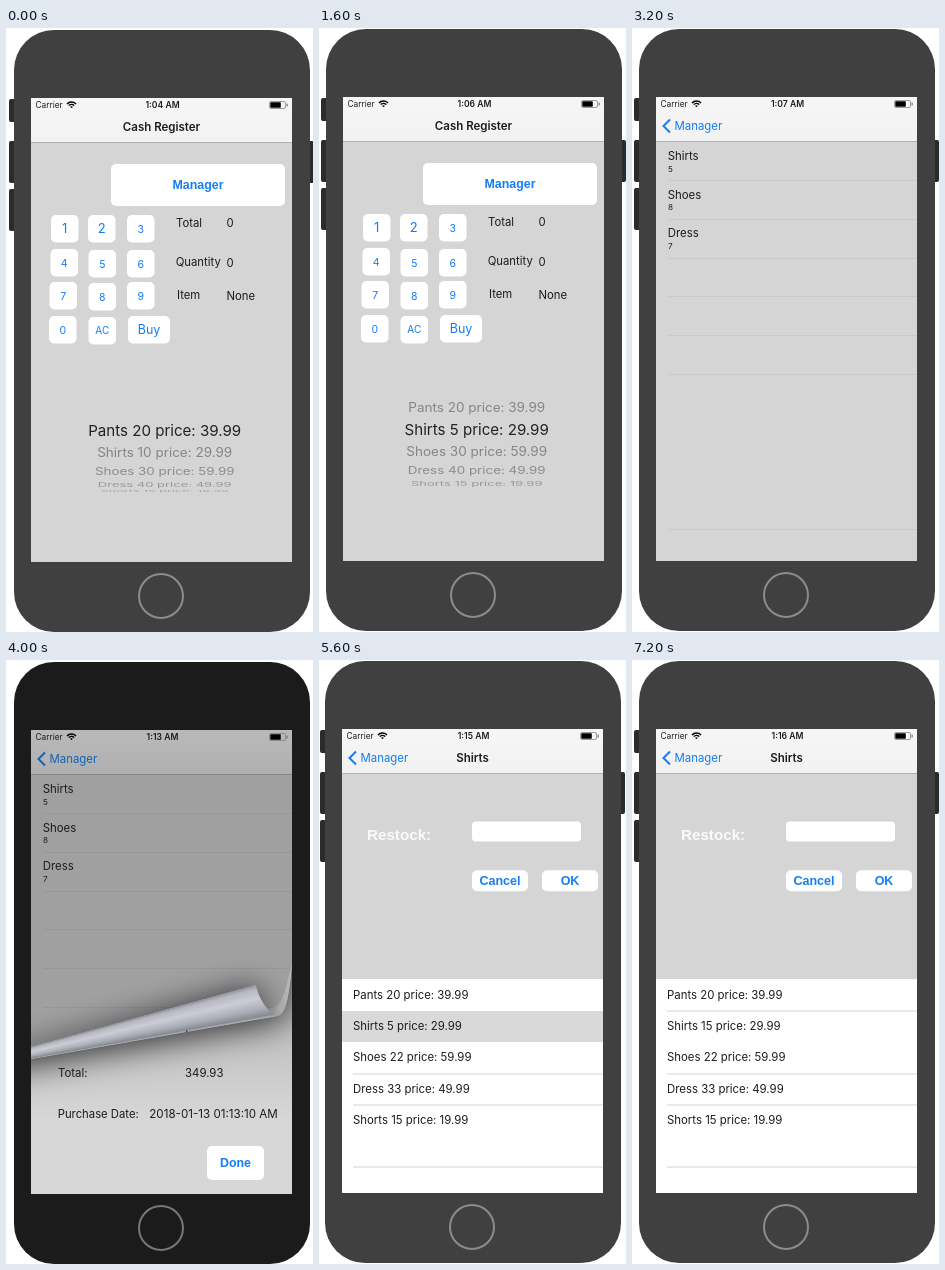
Write an HTML page with a canvas that moves like this. It is 307 by 604 pixels and loops after 8 s.

```html
<!DOCTYPE html>
<html lang="en">
<head>
<meta charset="utf-8">
<title>Cash register demo</title>
<style>
html, body { margin: 0; width: 100%; height: 100%; overflow: hidden; background: #fff; }
canvas { display: block; }
</style>
</head>
<body>
<canvas id="stage" width="307" height="604"></canvas>
<script>
const ctx = document.getElementById('stage').getContext('2d');
const BLUE = '#147df5', INK = '#1c1c1c', GREY = '#d5d5d5';
const SANS = 'Inter, sans-serif', HELV = '"Liberation Sans", Arial, sans-serif';
const STEP = 800;
const LEFT = 25, TOP = 70, RIGHT = 286, BOTTOM = 534;

function box(x, y, w, h, r, fill) {
  ctx.fillStyle = fill;
  ctx.beginPath();
  ctx.roundRect(x, y, w, h, r);
  ctx.fill();
}

function line(x1, y1, x2, y2, color) {
  ctx.strokeStyle = color;
  ctx.lineWidth = 1;
  ctx.beginPath();
  ctx.moveTo(x1, y1);
  ctx.lineTo(x2, y2);
  ctx.stroke();
}

function text(str, x, y, size, { color = INK, weight = 400, align = 'left', font = SANS } = {}) {
  ctx.font = `${weight} ${size}px ${font}`;
  ctx.fillStyle = color;
  ctx.textAlign = align;
  ctx.fillText(str, x, y);
}

function addStops(gradient, stops, span = 1) {
  for (const [at, color] of stops) gradient.addColorStop(at * span, color);
  return gradient;
}

function button(label, x, y, w, h, size, bold = true) {
  box(x, y, w, h, 5, '#fff');
  text(label, x + w / 2, y + h / 2 + size * 0.36, size, {
    color: BLUE, align: 'center', weight: bold ? 700 : 400, font: bold ? HELV : SANS
  });
}

function phone(dark) {
  if (!dark) {
    for (const [y, h] of [[71, 23], [113, 42], [161, 42]]) box(3, y, 7, h, 2, '#2b2b2b');
    box(301, 113, 7, 42, 2, '#2b2b2b');
  }
  box(8, 2, 296, 602, 40, dark ? '#1b1b1b' : '#404040');
  ctx.strokeStyle = dark ? '#777' : '#8c8c8c';
  ctx.lineWidth = 2;
  ctx.beginPath();
  ctx.arc(155, 568, 22, 0, Math.PI * 2);
  ctx.stroke();
}

function wifi(x, y) {
  ctx.strokeStyle = '#000';
  ctx.lineWidth = 1.5;
  for (const r of [6.2, 3.8, 1.2]) {
    ctx.beginPath();
    ctx.arc(x, y, r, -Math.PI * 0.76, -Math.PI * 0.24);
    ctx.stroke();
  }
}

function navBar(time, title, back, dark) {
  ctx.fillStyle = addStops(ctx.createLinearGradient(0, TOP, 0, 114),
    dark ? [[0, '#b9b9b9'], [1, '#b0b0b0']] : [[0, '#f6f6f6'], [1, '#f2f2f2']]);
  ctx.fillRect(LEFT, TOP, RIGHT - LEFT, 44);
  line(LEFT, 114.5, RIGHT, 114.5, dark ? '#868686' : '#b4b4b4');
  text('Carrier', 29.5, 79.8, 8.3);
  wifi(65.5, 80.2);
  text(time, 156.5, 79.8, 8.6, { weight: 600, align: 'center' });
  ctx.strokeStyle = '#777';
  ctx.lineWidth = 0.7;
  ctx.beginPath();
  ctx.roundRect(263.5, 73.5, 16, 7, 1.5);
  ctx.stroke();
  box(264.3, 74.3, 10.5, 5.4, 0.8, '#000');
  box(280.5, 75.5, 1.2, 3, 0.5, '#777');
  if (title) text(title, 155.5, 103, 11.5, { weight: 600, align: 'center' });
  if (back) {
    const color = dark ? '#1262b8' : BLUE;
    ctx.strokeStyle = color;
    ctx.lineWidth = 2;
    ctx.beginPath();
    ctx.moveTo(39, 92.5);
    ctx.lineTo(32.5, 99);
    ctx.lineTo(39, 105.5);
    ctx.stroke();
    text(back, 43.5, 103, 11.4, { color });
  }
}

const KEYS = [
  ['1', 45, 187, 13], ['2', 82, 187, 13], ['3', 121, 187, 10.5],
  ['4', 44.5, 221, 10.5], ['5', 82.5, 222, 10.5], ['6', 121, 222, 10.5],
  ['7', 43.5, 254, 10.5], ['8', 82.5, 255, 10.5], ['9', 121, 254, 10.5],
  ['0', 43, 288, 10.5], ['AC', 82.5, 289, 10]
];

function stock(pants, shirts, shoes, dress, shorts) {
  return [['Pants', pants, 39.99], ['Shirts', shirts, 29.99], ['Shoes', shoes, 59.99],
    ['Dress', dress, 49.99], ['Shorts', shorts, 19.99]]
    .map(([name, count, price]) => `${name} ${count} price: ${price}`);
}

// Rows lie on a wheel: the further from the middle, the flatter and paler.
const WHEEL = [
  { y: 402.5, size: 15.1, flat: 1, color: '#222' },
  { y: 424.5, size: 13.5, flat: 0.93, color: '#858585' },
  { y: 443, size: 13.4, flat: 0.74, color: '#8b8b8b' },
  { y: 457, size: 13, flat: 0.45, color: '#979797' },
  { y: 463.5, size: 12.7, flat: 0.2, color: '#a5a5a5' }
];

function picker(rows, chosen) {
  rows.forEach((row, i) => {
    const d = i - chosen, slot = WHEEL[Math.abs(d)];
    ctx.save();
    ctx.translate(158.7, d < 0 ? 805 - slot.y : slot.y);
    ctx.scale(1, slot.flat);
    text(row, 0, slot.size * 0.36, slot.size, { color: slot.color, align: 'center' });
    ctx.restore();
  });
}

function register(time, rows, chosen, total, quantity, item) {
  navBar(time, 'Cash Register');
  button('Manager', 105, 136, 174, 42, 12.4);
  for (const [label, x, y, size] of KEYS) button(label, x, y, 27.5, 27.5, size, false);
  button('Buy', 122, 288, 42, 27.5, 12.5, false);
  text('Total', 170, 199, 11.3);
  text(total, 220.5, 199, 11.3);
  text('Quantity', 169.7, 238, 11.3);
  text(quantity, 220.5, 238.5, 11.3);
  text('Item', 171, 270.8, 11.3);
  text(item, 220.5, 271.5, 11.3);
  picker(rows, chosen);
}

function menu() {
  navBar('1:07 AM', 'Manager', 'Back');
  button('History', 69, 190, 174, 42, 12.4);
  button('Restock', 69, 262, 174, 42, 12.4);
}

function sales(rule) {
  [['Shirts', 5], ['Shoes', 8], ['Dress', 7]].forEach(([name, count], i) => {
    text(name, 36.7, 132.7 + i * 38.8, 11.4);
    text(count, 37, 144.5 + i * 38.8, 8.2);
  });
  for (const i of [0, 1, 2, 3, 4, 5, 9]) {
    const y = Math.round(153 + i * 38.8) + 0.5;
    line(37, y, RIGHT, y, rule);
  }
}

function history() {
  navBar('1:07 AM', '', 'Manager');
  sales('#c9c9c9');
}

// The rolled sheet is a cone; its two edges meet at the apex.
const APEX = [-93, 419.7];

function pagePath() {
  ctx.beginPath();
  ctx.moveTo(-93, TOP);
  ctx.lineTo(RIGHT, TOP);
  ctx.lineTo(RIGHT, 303);
  ctx.bezierCurveTo(284, 328, 281, 354, 272, 356);
  ctx.lineTo(...APEX);
  ctx.closePath();
}

function rollPath() {
  ctx.beginPath();
  ctx.moveTo(...APEX);
  ctx.lineTo(249.5, 325);
  ctx.bezierCurveTo(253, 338, 260, 351, 271, 356);
  ctx.closePath();
}

function curl() {
  ctx.fillStyle = addStops(ctx.createLinearGradient(0, 360, 0, 460), [[0, '#bebebe'], [1, '#d7d7d7']]);
  ctx.fillRect(LEFT, 280, RIGHT - LEFT, BOTTOM - 280);

  ctx.save();
  ctx.shadowColor = 'rgba(0,0,0,.8)';
  ctx.shadowBlur = 34;
  ctx.shadowOffsetY = 4;
  ctx.fillStyle = '#a0a0a0';
  pagePath();
  ctx.fill();
  ctx.restore();

  ctx.save();
  pagePath();
  ctx.clip();
  navBar('1:13 AM', '', 'Manager', true);
  sales('#979797');
  ctx.shadowColor = 'rgba(25,25,35,.8)';
  ctx.shadowBlur = 30;
  ctx.fillStyle = '#aaa';
  rollPath();
  ctx.fill();
  ctx.restore();

  const upper = Math.atan(-0.277), lower = Math.atan(-0.175);
  ctx.fillStyle = addStops(ctx.createConicGradient(upper, ...APEX), [
    [0, '#8f9099'], [0.12, '#b6b7c0'], [0.4, '#cbccd4'], [0.72, '#acaeb7'], [0.93, '#888a92'], [1, '#b4b5bd']
  ], (lower - upper) / (2 * Math.PI));
  rollPath();
  ctx.fill();

  ctx.fillStyle = addStops(ctx.createLinearGradient(258, 0, RIGHT, 0),
    [[0, '#777'], [0.5, '#a4a4a4'], [1, '#bcbcbc']]);
  ctx.beginPath();
  ctx.moveTo(RIGHT, 303);
  ctx.bezierCurveTo(284, 328, 281, 354, 272, 356);
  ctx.bezierCurveTo(268, 355, 264, 352, 261, 348);
  ctx.bezierCurveTo(276, 352, 280, 328, RIGHT, 303);
  ctx.fill();

  box(180, 370.5, 1.5, 1.5, 0, '#333');
  text('Total:', 52, 416.5, 11.4);
  text('349.93', 179, 416.5, 11.4);
  text('Purchase Date:', 51.7, 458, 11.3);
  text('2018-01-13 01:13:10 AM', 143.3, 458, 11.6);
  button('Done', 201, 486, 57, 34, 12.4);
}

function restock(time, title, rows, typed, chosen) {
  navBar(time, title, 'Manager');
  text('Restock:', 50, 180.8, 15.2, { color: '#fafafa', weight: 700, font: HELV });
  box(155, 162.5, 109, 20, 4, '#fff');
  text(typed, 160, 177, 11);
  button('Cancel', 155, 211.3, 56, 21, 12.5);
  button('OK', 225, 211.3, 56, 21, 12.5);
  ctx.fillStyle = '#fff';
  ctx.fillRect(LEFT, 320, RIGHT - LEFT, BOTTOM - 320);
  if (chosen) {
    ctx.fillStyle = '#d9d9d9';
    ctx.fillRect(LEFT, 352, RIGHT - LEFT, 31);
  }
  rows.forEach((row, i) => text(row, 36, 340 + i * 31.2, 11.4));
  for (const y of [352, 415, 446, 508]) {
    if (!chosen || y > 352) line(36, y, RIGHT, y, '#d4d4d4');
  }
}

const FULL = stock(20, 10, 30, 40, 15), SOLD = stock(20, 5, 30, 40, 15);
const LOW = stock(20, 5, 22, 33, 15), FILLED = stock(20, 15, 22, 33, 15);

// Each scene: horizontal and vertical shift of the phone, its screen, dark body.
const SCENES = [
  [0, 0, () => register('1:04 AM', FULL, 0, '0', '0', 'None')],
  [-1, 0, () => register('1:05 AM', FULL, 1, '149.95', '5', 'Shirts')],
  [-1, -1, () => register('1:06 AM', SOLD, 1, '0', '0', 'None')],
  [-1, -1, menu],
  [-1, -1, history],
  [0, 0, curl, true],
  [0, -1, () => restock('1:14 AM', '', LOW, '', false)],
  [-2, -1, () => restock('1:15 AM', 'Shirts', LOW, '', true)],
  [-1, -1, () => restock('1:15 AM', 'Shirts', LOW, '10', true)],
  [-1, -1, () => restock('1:16 AM', 'Shirts', FILLED, '', false)]
];

function draw(now) {
  const [dx, dy, screen, dark] = SCENES[Math.floor(now / STEP) % SCENES.length];
  ctx.fillStyle = '#fff';
  ctx.fillRect(0, 0, 307, 604);
  ctx.save();
  ctx.translate(dx, dy);
  phone(dark);
  ctx.beginPath();
  ctx.rect(LEFT, TOP, RIGHT - LEFT, BOTTOM - TOP);
  ctx.clip();
  ctx.fillStyle = GREY;
  ctx.fillRect(LEFT, TOP, RIGHT - LEFT, BOTTOM - TOP);
  screen();
  ctx.restore();
}

function tick() {
  draw(performance.now());
  requestAnimationFrame(tick);
}
tick();
</script>
</body>
</html>
```
